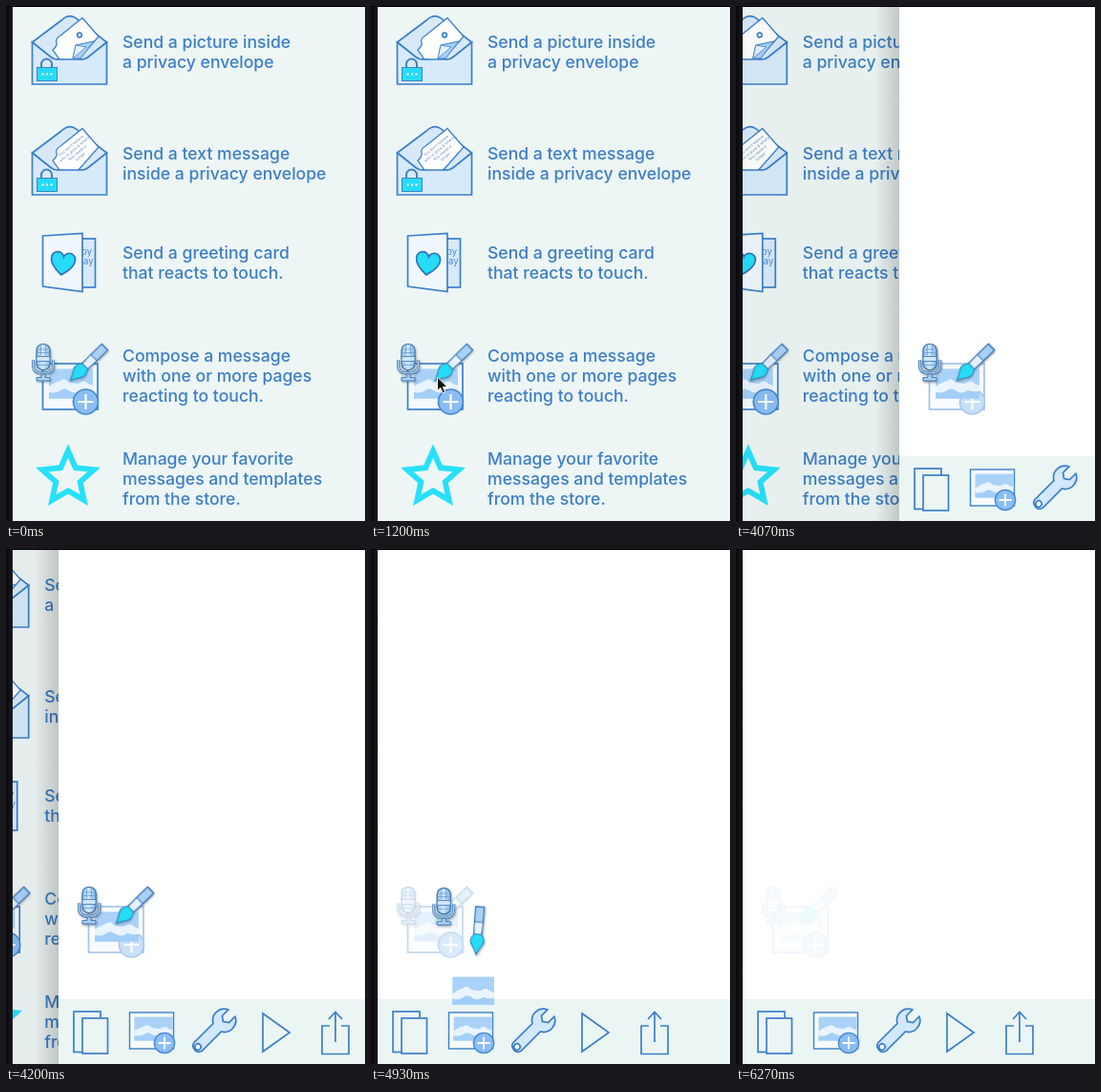
An HTML page that plays this animation: 376x540 px, repeating every 6470 ms.

```html
<!DOCTYPE html>
<html lang="en">
<head>
<meta charset="utf-8">
<title>Compose a message</title>
<style>
html, body { margin: 0; width: 100%; height: 100%; overflow: hidden; background: #fff; }
svg { display: block; width: 100vw; height: 100vh; }
.line { fill: none; stroke: #3b7fc9; stroke-width: 1.7; }
.label { font: 500 17.6px Inter, "Open Sans", sans-serif; fill: #3d7ec6; }
.tiny { font: 4px Inter, sans-serif; fill: #5f87b5; text-anchor: middle; }
</style>
</head>
<body>
<svg viewBox="0 0 376 540" preserveAspectRatio="none">
  <defs>
    <filter id="soft" x="-40%" y="-30%" width="190%" height="170%">
      <feDropShadow dx="1" dy="1.2" stdDeviation="1.1" flood-color="#345" flood-opacity=".45"/>
    </filter>
    <linearGradient id="edge"><stop stop-color="#000" stop-opacity="0"/><stop offset="1" stop-color="#000" stop-opacity=".17"/></linearGradient>
    <linearGradient id="strip"><stop stop-color="#08080c"/><stop offset="1" stop-color="#1b1b20"/></linearGradient>
    <linearGradient id="metal"><stop stop-color="#8fbfee"/><stop offset=".45" stop-color="#d3e9fc"/><stop offset="1" stop-color="#88b9ea"/></linearGradient>
    <clipPath id="inner"><rect x="80.5" y="244" width="13" height="51"/></clipPath>

    <g id="pic">
      <rect x="-23" y="-15.5" width="46" height="31" fill="#aad2f9"/>
      <path d="M-23 3 Q-16 -2 -11 -3 Q-7 -7 -3 -2 Q3 0 8 0 Q14 -5 18 0 L23 2 V8 Q16 9 11 7 Q5 12 -1 8 Q-7 3 -12 8 Q-17 11 -23 9Z" fill="#e9f4fe"/>
      <path d="M-23 9 Q-17 11 -12 8 Q-7 3 -1 8 Q5 12 11 7 Q16 9 23 8 V15.5 H-23Z" fill="#a3cef8"/>
    </g>
    <g id="plus">
      <circle r="13" fill="#8abdf3" stroke="#4387d0" stroke-width="1.6"/>
      <path d="M-8 0H8M0 -8V8" stroke="#fff" stroke-width="2.2"/>
    </g>
    <g id="mic" filter="url(#soft)">
      <path d="M-10.500 -3V3Q-10.500 11 0 11Q10.500 11 10.500 3V-3" fill="none" stroke="#5486b8" stroke-width="3"/>
      <path d="M-10.500 -3V3Q-10.500 11 0 11Q10.500 11 10.500 3V-3" fill="none" stroke="#b7d8f5" stroke-width="1.2"/>
      <path d="M-2 12H2V15.5H7V19H-7V15.5H-2Z" fill="#a9cff2" stroke="#4a7fb5"/>
      <rect x="-7" y="-19.5" width="14" height="27" rx="6.5" fill="url(#metal)" stroke="#3e74ac" stroke-width="1.2"/>
      <path d="M-5 -14H5M-6 -10.5H6M-6 2.500H6M-2.500 -18V-8M2.500 -18V-8" stroke="#6b9fd2" stroke-width=".8"/>
      <rect x="-7" y="-6.5" width="14" height="5" fill="#cfe6fb" stroke="#4a80b8" stroke-width=".9"/>
    </g>
    <g id="brush" filter="url(#soft)">
      <path d="M-4.500 -25H4.500V-8L4 4H-4L-4.500 -8Z" fill="#a9d2f8" stroke="#3b75b4" stroke-width="1.3"/>
      <path d="M-4.500 -9H4.500L4 4H-4Z" fill="#e2f1fe" stroke="#3b75b4" stroke-width="1"/>
      <path d="M-4 4H4Q9 10 5.500 15Q2 20 0 25Q-2 20 -5.500 15Q-9 10 -4 4Z" fill="#27dcf7" stroke="#2b87b8" stroke-width="1.1"/>
    </g>
    <g id="compose">
      <rect class="line" x="38.5" y="375" width="57.5" height="48" style="fill:#f3f9fd"/>
      <use href="#pic" x="68" y="396"/>
      <use href="#plus" x="83.5" y="415"/>
      <use href="#brush" transform="translate(85.5 375) rotate(46)"/>
      <use href="#mic" x="39" y="374"/>
    </g>
    <path id="flap" class="line" d="M27.500 38L58 15Q67 6 76 15L105.500 38L85 56H49Z" style="fill:#d7e9f9"/>
    <g id="front">
      <path class="line" d="M27.500 38L47 53.500Q50 56 53 56H80Q83 56 86 53.500L105.500 38V82H27.500Z" style="fill:#d7eafb"/>
      <path d="M37 65V61A5.500 5.500 0 0 1 48 61V65" fill="none" stroke="#4681be" stroke-width="2"/>
      <rect x="32.500" y="64.500" width="21" height="14" fill="#27dcf7" stroke="#3a86c4"/>
      <path d="M37.500 71.500h2M42 71.500h2M46.500 71.500h2" stroke="#fff" stroke-width="2"/>
    </g>
    <path id="sheet" class="line" d="M49 46Q55 41 52.500 37Q53 33 57 31L80 12.500L97 32L74 58L56 56Z" style="fill:#fff;stroke-width:1.3"/>
  </defs>

  <rect width="376" height="540" fill="#edf6f5"/>
  <g id="list">
    <use href="#flap"/><use href="#sheet"/>
    <circle class="line" cx="77" cy="30.500" r="2.3"/>
    <path d="M70 55L73 41L92 37L78 55Z" fill="#a9d1f7" stroke="#3b7fc9"/>
    <path d="M70 55L73 41L84 43Z" fill="#e6f2fd" stroke="#3b7fc9" stroke-width=".8"/>
    <use href="#front"/>
    <g transform="translate(0 116)">
      <use href="#flap"/><use href="#sheet"/>
      <g class="tiny" transform="translate(73 36) rotate(-40)">
        <text y="-6">You don't believe</text><text y="-1">who is gone &amp; where</text>
        <text y="4">She needs a</text><text y="9">longer</text>
      </g>
      <use href="#front"/>
    </g>
    <rect class="line" x="72" y="244" width="21.500" height="51" style="fill:#d7eafb"/>
    <g clip-path="url(#inner)" font-family="Inter, sans-serif" font-size="9.500" fill="#4a86c8" text-anchor="end">
      <text x="90" y="261">Happy</text><text x="91.500" y="271">Birthday</text>
    </g>
    <path class="line" d="M38.500 241L80 238.500V299.500L38.500 294Z" style="fill:#eff7fc"/>
    <path transform="translate(59.500 269.500) rotate(8) scale(.96)" d="M0 13Q-13 4 -13 -4A6.700 6.700 0 0 1 0 -7A6.700 6.700 0 0 1 13 -4Q13 4 0 13Z" fill="#27dcf7" stroke="#3172b8" stroke-width="1.8"/>
    <use id="icon" href="#compose"/>
    <path id="star" fill="none" stroke="#27e0fa" stroke-width="5.8" stroke-miterlimit="8"/>
    <g id="labels" class="label"></g>
  </g>

  <rect id="dim" width="376" height="540"/>
  <g id="page">
    <rect x="-25" width="25" height="540" fill="url(#edge)"/>
    <rect width="376" height="540" fill="#fff"/>
    <rect y="472" width="376" height="68" fill="#ebf5f4"/>
    <g transform="translate(-7 0)">
      <use id="ghost" href="#compose"/>
      <rect class="line" x="23" y="485" width="28" height="42.500"/>
      <rect class="line" x="32" y="492" width="26.500" height="37" style="fill:#ebf5f4"/>
      <rect class="line" x="81.500" y="486" width="46" height="38" style="fill:#f6fbfe;stroke-width:1.4"/>
      <use href="#pic" transform="translate(106.500 503) scale(.87 .8)"/>
      <use href="#plus" transform="translate(118 518) scale(.82)"/>
      <g class="line" transform="translate(153 522) rotate(45)">
        <path d="M-6 0A6.200 6.200 0 0 0 6 0V-28.600A12 12 0 0 0 5 -50V-41L0 -37.500L-5 -41V-50A12 12 0 0 0 -6 -28.600Z" fill="#d2e8fb"/>
        <circle r="3.200" fill="#fff"/>
      </g>
      <path class="line" d="M221 487L249 507L221 527Z"/>
      <path class="line" d="M291 500H283V529.500H311V500H303M297 517V486M290 493L297 485.500L304 493"/>
      <use id="flyPic" href="#pic"/>
      <use id="flyBrush" href="#brush"/>
      <use id="flyMic" href="#mic"/>
    </g>
  </g>

  <rect width="7" height="540" fill="url(#strip)"/>
  <rect width="376" height="1" fill="#000"/>
  <path id="cursor" d="M0 0V14.500L3.300 11.500L5.700 16.800L8.200 15.600L5.900 10.500H10.500Z" fill="#111" stroke="#fff" stroke-width="1"/>
</svg>
<script>
const LOOP = 6470, STEP = 1000 / 15;
const TAP = 3660, SWITCH = 3860, SLIDE = 3920;
const $ = id => document.getElementById(id);
const clamp = v => Math.max(0, Math.min(1, v));
const set = (id, x, y, opacity = 1, rest = "") => {
  $(id).setAttribute("transform", `translate(${x} ${y}) ${rest}`);
  $(id).setAttribute("opacity", opacity);
};

const labels = [
  [44, "Send a picture inside", "a privacy envelope"],
  [161, "Send a text message", "inside a privacy envelope"],
  [265, "Send a greeting card", "that reacts to touch."],
  [373, "Compose a message", "with one or more pages", "reacting to touch."],
  [481, "Manage your favorite", "messages and templates", "from the store."]
];
$("labels").innerHTML = labels.map(([y, ...lines]) =>
  lines.map((s, i) => `<text x="122" y="${y + 21 * i}">${s}</text>`).join("")).join("");

$("star").setAttribute("d", "M" + Array.from({ length: 10 }, (_, i) => {
  const a = i * Math.PI / 5, r = i % 2 ? 13.3 : 28.5;
  return [65 + r * Math.sin(a), 495 - r * Math.cos(a)].map(v => v.toFixed(2));
}).join("L") + "Z");

// Each key is [time, ...values]; tangents come from the neighbouring keys.
function track(t, keys) {
  const last = keys.length - 1;
  if (t <= keys[0][0]) return keys[0].slice(1);
  if (t >= keys[last][0]) return keys[last].slice(1);
  const i = keys.findIndex(k => k[0] > t) - 1;
  const a = keys[i], b = keys[i + 1], d = b[0] - a[0], u = (t - a[0]) / d;
  const slope = (n, c) => n < 1 || n >= last ? 0
    : (keys[n + 1][c] - keys[n - 1][c]) / (keys[n + 1][0] - keys[n - 1][0]);
  return a.slice(1).map((p, n) => {
    const c = n + 1, e = u * u * (3 - 2 * u);
    return p + (b[c] - p) * e + d * u * (1 - u) * ((1 - u) * slope(i, c) - u * slope(i + 1, c));
  });
}

const micKeys = [[4330, 39, 374], [4930, 76, 375], [5200, 91, 410], [5530, 97, 466], [5900, 99, 486], [6250, 99, 502]];
const brushKeys = [[4270, 85.5, 375, 46], [4930, 112, 400, 5], [5260, 119, 434, 0], [5530, 116.5, 472.5, 3], [6000, 117, 492, 6]];
const picKeys = [[4270, 68, 396, 1], [4930, 107, 463, .95], [5330, 107, 492, .87]];
const ghostKeys = [[4000, .48], [4200, .45], [4930, .3], [5530, .17], [6270, .07]];
const cursorKeys = [[266, 177, 532], [520, 108, 446], [870, 71.5, 392.5], [1200, 69.5, 389]];

function slide(t) {
  const at = t < 4060 ? Math.min(t, 3934) : t; // short hitch before the push
  const x = Math.max(0, at - SLIDE) * .0127;
  return 1 - (1 + x) * Math.exp(-x);
}

function draw(t) {
  const p = slide(t), fade = (from, to) => 1 - clamp((t - from) / (to - from));
  set("list", -94 * p, 0);
  $("dim").setAttribute("opacity", p * .04);
  set("page", 7 + 369 * (1 - p), 0, p > 0 ? 1 : 0);
  $("icon").setAttribute("opacity", t >= TAP && t < SWITCH ? .5 : 1);
  $("ghost").setAttribute("opacity", track(t, ghostKeys)[0]);

  const [px, py, ps] = track(t, picKeys);
  set("flyPic", px, py, fade(4950, 5330), `scale(${ps})`);
  const [bx, by, turn] = track(t, brushKeys);
  set("flyBrush", bx, by, fade(5600, 6000), `rotate(${turn})`);
  const [mx, my] = track(t, micKeys), m = fade(5850, 6260);
  set("flyMic", mx, my, m, `scale(${.6 + .4 * m})`);

  const [cx, cy] = track(t, cursorKeys);
  set("cursor", cx, cy, t >= 260 && t < SWITCH ? 1 : 0);
}

const start = performance.now();
function tick() {
  const t = (performance.now() - start) % LOOP;
  draw(Math.floor((t + 4) / STEP) * STEP);
  requestAnimationFrame(tick);
}
tick();
</script>
</body>
</html>
```
